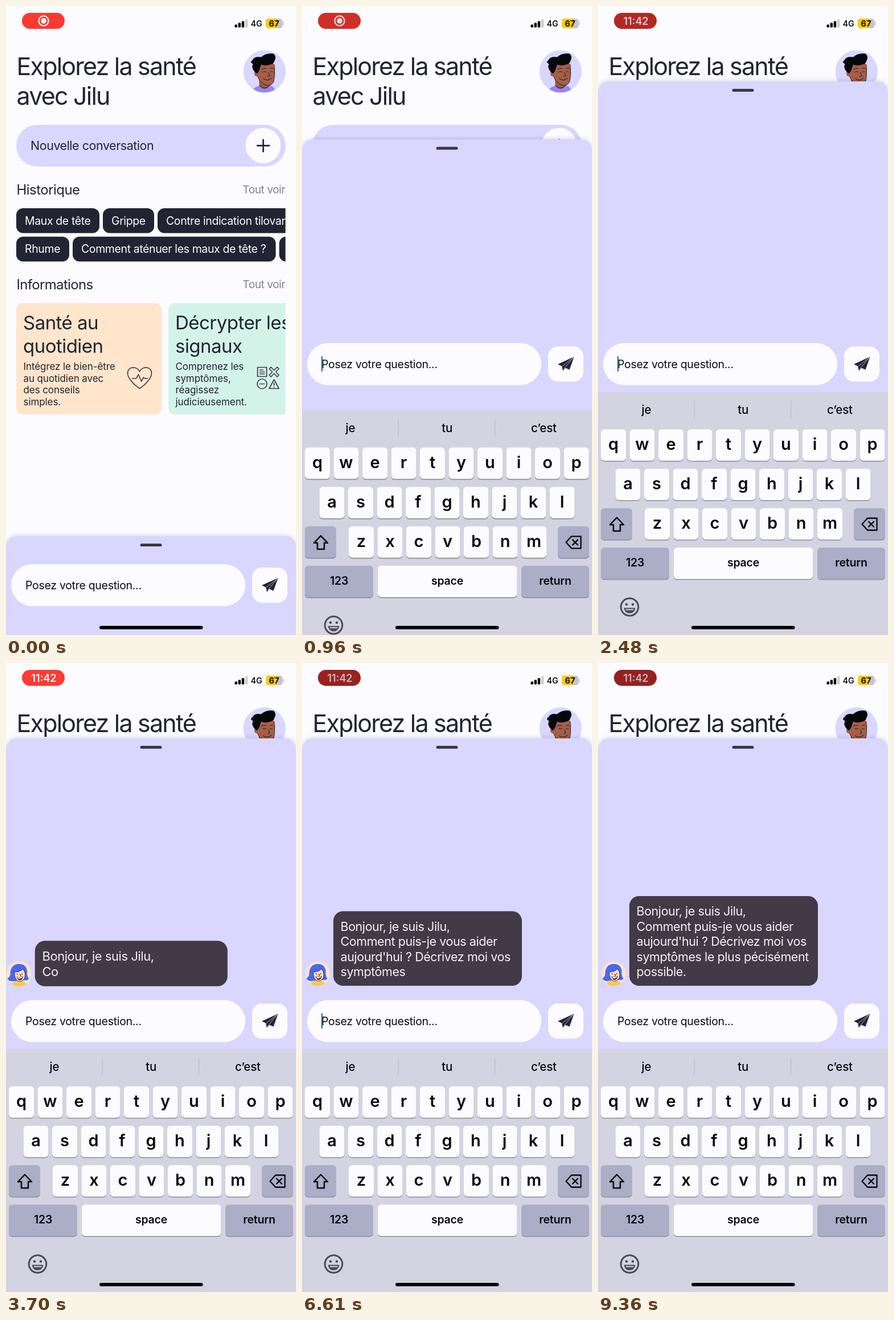
Animation of 509 by 1101 pixels, one loop 9.38 s. Source, as an HTML page with a canvas:

```html
<!DOCTYPE html>
<html lang="fr">
<head>
<meta charset="utf-8">
<title>Assistant santé</title>
<style>
html, body { margin: 0; width: 100%; height: 100%; overflow: hidden; background: #fcfbff; }
canvas { display: block; width: 509px; height: 1101px; }
</style>
</head>
<body>
<canvas id="stage"></canvas>
<script>
const W = 509, H = 1101, LOOP = 9380;
const INK = '#222433', PAPER = '#fcfbff', LILAC = '#d9d7ff', PLUM = '#433a47';
const canvas = document.getElementById('stage');
const c = canvas.getContext('2d');
const dpr = window.devicePixelRatio || 1;
canvas.width = W * dpr;
canvas.height = H * dpr;

const MESSAGE = [
  'Bonjour, je suis Jilu,',
  'Comment puis-je vous aider',
  "aujourd'hui ? Décrivez moi vos",
  'symptômes le plus pécisément',
  'possible.'
];

// helpers
const clamp = x => Math.max(0, Math.min(1, x));
const spring = x => x <= 0 ? 0 : 1 - (1 + x) * Math.exp(-x);

function text(s, x, y, size, o = {}) {
  c.font = `${o.weight || 400} ${size}px Inter, Roboto, sans-serif`;
  c.letterSpacing = (o.track ?? -0.022) * size + 'px';
  c.textAlign = o.align || 'left';
  c.fillStyle = o.color || INK;
  c.fillText(s, x, y);
}

function box(x, y, w, h, r, fill) {
  c.beginPath();
  c.roundRect(x, y, w, h, r);
  c.fillStyle = fill;
  c.fill();
}

function disc(x, y, r, fill) {
  c.beginPath();
  c.arc(x, y, r, 0, 7);
  c.fillStyle = fill;
  c.fill();
}

function shape(d, fill) {
  c.fillStyle = fill;
  c.fill(new Path2D(d));
}

function line(d, color, width) {
  c.strokeStyle = color;
  c.lineWidth = width;
  c.lineCap = c.lineJoin = 'round';
  c.stroke(new Path2D(d));
}

function at(x, y, draw) {
  c.save();
  c.translate(x, y);
  draw();
  c.restore();
}

// recording badge brightness: [time, level], eased between
const PULSE = [[0, .95], [980, .55], [1900, 1], [2800, 0], [3650, 1], [4800, 0],
  [5700, 1], [6750, 0], [7800, 1], [8400, 1], [9380, 0]];

function pulse(t) {
  const i = PULSE.findIndex(p => p[0] > t);
  const [t0, a] = PULSE[i - 1], [t1, b] = PULSE[i];
  return a + (b - a) * (1 - Math.cos(Math.PI * (t - t0) / (t1 - t0))) / 2;
}

function statusBar(t) {
  const k = pulse(t), mix = (a, b) => Math.round(a + (b - a) * k);
  const white = `rgb(${mix(192, 255)},${mix(188, 255)},${mix(190, 255)})`;
  box(28, 12, 75, 28, 14, `rgb(${mix(150, 255)},${mix(32, 59)},${mix(30, 49)})`);
  if (t < 2000) {
    disc(66, 26, 4.8, white);
    c.beginPath();
    c.arc(66, 26, 8.6, 0, 7);
    c.strokeStyle = white;
    c.lineWidth = 2.2;
    c.stroke();
  } else {
    text('11:42', 66.5, 32.5, 18, { weight: 600, color: white, align: 'center', track: 0 });
  }
  for (let i = 0; i < 4; i++) {
    const h = 5 + i * 3;
    box(401.5 + i * 6.1, 37.5 - h, 4.4, h, 1.2, i < 3 ? '#000' : '#cbcbd0');
  }
  text('4G', 429.5, 36, 14.3, { weight: 600, color: '#111', track: 0 });
  box(456, 22, 29.5, 17, 5, '#c5c5ca');
  c.save();
  c.beginPath();
  c.rect(456, 22, 20, 17);
  c.clip();
  box(456, 22, 29.5, 17, 5, '#ffcc00');
  c.restore();
  box(486.3, 27.5, 1.6, 6, 1, '#c5c5ca');
  text('67', 470.5, 36, 15, { weight: 700, color: '#111', align: 'center', track: 0 });
}

function userAvatar() {
  c.save();
  disc(0, 0, 37, LILAC);
  c.beginPath();
  c.arc(0, 0, 37, 0, 7);
  c.clip();
  shape('M-22 40Q-21 27-9 25L9 24Q19 27 21 40Z', '#9187fa');
  shape('M-10 10L-9 26Q1 36 9 25L10 12Z', '#9a5945');
  shape('M-13-12Q3-19 17-13Q20 4 16 18Q12 26 4 24Q-8 21-12 9Q-18 9-18 3Q-17-2-12 0Z', '#a45f49');
  shape('M-13 4L-17 1Q-24-7-20-13Q-27-16-21-20Q-17-27-6-25Q4-33 16-31Q22-26 17-17Q16-13 10-12Q2-9-6-12L-9-2Z', '#08080c');
  line('M-9 25Q1 34 9 24M-12 9Q-8 21 4 24Q12 26 16 18Q19 4 17-12', '#1b1728', .9);
  line('M-5-4Q-1-7 3-5M10-5Q13-7 15-5M-3 1Q0-1 3 1M10 1Q12-1 14 1M7 2L9 8L6 9M-2 13Q6 18 12 12', '#25140f', 1);
  c.restore();
}

function assistantAvatar() {
  c.save();
  disc(0, 0, 21.5, '#fee3ca');
  c.beginPath();
  c.arc(0, 0, 21.5, 0, 7);
  c.clip();
  shape('M-20 8Q-14 5-15-3Q-13-16-1-17Q13-17 14-4Q13 4 17 8Q15 12 10 11L-11 13Q-18 13-20 8Z', '#4868ee');
  shape('M-15 24Q-14 14-5 13L6 13Q15 16 16 24Z', '#fac83f');
  shape('M-4 8L-4 14Q0 19 6 14L6 8Z', '#f8c6a5');
  shape('M-8-3Q2-3 6-8Q12-4 10 6Q7 14 0 13Q-8 11-8-3Z', '#ffd9bd');
  line('M-8-3Q2-3 6-8Q12-4 10 6Q7 14 0 13Q-8 11-8-3', '#252c50', .9);
  line('M-3 0V1M5 0V1M2 1L3 4', '#252438', 1.3);
  shape('M-4 5Q2 7 7 4Q6 11 1 11Q-3 10-4 5Z', '#40212a');
  shape('M-3 6Q2 7 6 5L5 7Q1 9-2 8Z', '#fff');
  c.restore();
}

function chip(s, x, y, w) {
  box(x, y, w, 43.5, 12, INK);
  text(s, x + 15, y + 28.5, 19.5, { color: PAPER, track: -.02 });
}

function card(x, fill, title, body) {
  box(x, 520, 255, 195, 12, fill);
  title.forEach((s, i) => text(s, x + 12, 566 + i * 41, 33, { track: -.016 }));
  body.forEach((s, i) => text(s, x + 12.5, 637 + i * 20.5, 17, { track: -.005 }));
}

function home() {
  text('Explorez la santé', 18.5, 120.5, 43, { track: -.042 });
  text('avec Jilu', 18.5, 173, 43, { track: -.042 });
  at(453.7, 114.5, userAvatar);

  box(18, 208, 473, 73, 36.5, LILAC);
  text('Nouvelle conversation', 43, 252, 21.5);
  disc(451.3, 244.3, 31, PAPER);
  line('M441 244.3H462M451.5 234V255', INK, 2.7);

  const more = { color: '#83828a', align: 'right' };
  text('Historique', 18.5, 330, 24);
  text('Tout voir', 490, 328, 19, more);
  text('Informations', 18.5, 496, 24, { track: -.028 });
  text('Tout voir', 490, 494, 19, more);

  c.save();
  c.beginPath();
  c.rect(18, 340, 472.5, 400);
  c.clip();
  chip('Maux de tête', 18, 354, 146);
  chip('Grippe', 170, 354, 90);
  chip('Contre indication tilovane', 266, 354, 270);
  chip('Rhume', 18, 403.7, 93);
  chip('Comment aténuer les maux de tête ?', 117, 403.7, 356.5);
  chip('Fièvre', 479.5, 403.7, 90);
  card(18, '#fee5cb', ['Santé au', 'quotidien'],
    ['Intégrez le bien-être', 'au quotidien avec', 'des conseils', 'simples.']);
  card(285, '#d4f3e8', ['Décrypter les', 'signaux'],
    ['Comprenez les', 'symptômes,', 'réagissez', 'judicieusement.']);
  c.restore();

  at(234.5, 651, () => line('M0 18.5C-12 11-21-1-21-8C-21-21-4-21 0-11C4-21 21-21 21-8C21-1 12 11 0 18.5Z' +
    'M-13 1H-6L-2-6L3 6L7-1L9 1H14', PLUM, 1.6));
  at(460, 651, () => {
    line('M-18.5-18.5H-2.5V-2.5H-18.5ZM-14.5-14H-9M-14.5-10.5H-6.5M-14.5-7H-6.5', PLUM, 1.7);
    line('M2-16L5-19L10.5-13.5L16-19L19-16L13.5-10.5L19-5L16-2L10.5-7.5L5-2L2-5L7.5-10.5Z', PLUM, 1.6);
    line('M-2 10.5A8.5 8.5 0 1 1-19 10.5A8.5 8.5 0 1 1-2 10.5ZM-14.5 10.5H-6.5', PLUM, 1.7);
    line('M10.5 3L19 18.5H2ZM10.5 9V13M10.5 15.8V16', PLUM, 1.7);
  });
}

function inputBar(y, t, focused) {
  box(9, y, 411, 73.5, 36.7, PAPER);
  text('Posez votre question...', 34, y + 43.5, 19.5, { color: '#0b0b10', track: -.015 });
  if (focused) {
    // solid just after focus, then a soft blink
    const p = t / 1100 % 1;
    const blink = p > .5 ? clamp((p - .88) / .08) : clamp((.34 - p) / .07);
    c.globalAlpha = t < 1400 ? 1 : blink;
    box(33.8, y + 23, 2.4, 27, 1.2, '#4767d2');
    c.globalAlpha = 1;
  }
  box(432, y + 6, 62, 61.5, 17, PAPER);
  at(463, y + 36.5, () => {
    shape('M14.5-12.5L-14 .5L-7 4L-5 12.5L-1 7L6.5 10Z', INK);
    line('M13-11L-6.5 4.2M13-11L-1.5 6.5L-4.5 11', '#b9b8cd', .9);
  });
}

function bubble(t) {
  const x = (t - 2500) / 1000;
  if (x <= 0) return;
  const scale = 1 - Math.exp(-3.2 * x) * Math.cos(2.6 * x);
  let left = Math.floor(t < 5410 ? 25 + (t - 3700) / 47.5 : 61 + (t - 5410) / 41);
  const lines = [];
  for (const s of MESSAGE) {
    if (left <= 0 && lines.length) break;
    lines.push(s.slice(0, Math.max(0, left)));
    left -= s.length + 1;
  }
  const h = 25 + 26.4 * lines.length, top = 565 - h, mid = 565 - h / 2;
  c.save();
  c.translate(254, mid);
  c.scale(scale, scale);
  c.translate(-254, -mid);
  at(27.7, 543.7, assistantAvatar);
  box(55, top, 331, h, 17, PLUM);
  lines.forEach((s, i) => text(s, 67.5, top + 34.3 + i * 26.4, 21.5, { color: '#f4f0f6', track: -.02 }));
  c.restore();
}

function key(x, y, w, fill = PAPER) {
  box(x, y + 1.6, w, 55, 6, '#8d8d9b');
  box(x, y, w, 55, 6, fill);
}

function keyboard(top) {
  if (top >= H) return;
  const grey = '#abaec6', black = '#08080c';
  at(0, top, () => {
    c.fillStyle = '#d4d3e2';
    c.fillRect(0, 0, W, 500);
    ['je', 'tu', 'c’est'].forEach((s, i) =>
      text(s, 85 + i * 169.7, 38, 20.5, { weight: 500, align: 'center', color: black, track: -.01 }));
    c.fillStyle = '#b7b7c6';
    c.fillRect(168.5, 15, 1, 31);
    c.fillRect(338, 15, 1, 31);

    [['qwertyuiop', 5], ['asdfghjkl', 30.5], ['zxcvbnm', 82]].forEach(([row, x0], r) => {
      [...row].forEach((ch, i) => {
        const x = x0 + i * 50.5, y = 65 + r * 69;
        key(x, y, 44);
        text(ch, x + 22, y + 36, 29, { weight: 600, align: 'center', color: black, track: 0 });
      });
    });

    key(5, 203, 55, grey);
    key(449, 203, 55, grey);
    line('M33 219.5L45 232H39V243H27V232H21Z', black, 2.5);
    line('M473 220.5H489.5V241.5H473L463.5 231ZM475 226.5L484 235.5M484 226.5L475 235.5', black, 2.3);

    key(5, 272, 120, grey);
    key(133, 272, 244.5);
    key(385, 272, 119, grey);
    [['123', 65], ['space', 255], ['return', 444.5]].forEach(([s, x]) =>
      text(s, x, 305, 19.5, { weight: 600, align: 'center', color: black, track: -.01 }));

    const face = '#4c4c57';
    c.beginPath();
    c.arc(55.5, 376, 15.3, 0, 7);
    c.strokeStyle = face;
    c.lineWidth = 3;
    c.stroke();
    disc(50, 371.5, 2.2, face);
    disc(61, 371.5, 2.2, face);
    shape('M45.5 377.5H65.5Q64 387 55.5 387Q47 387 45.5 377.5Z', face);
    line('M49.5 380.5H61.5', '#d4d3e2', 2);
  });
}

function sheet(t) {
  const top = 928 - 796 * spring((t - 410) * .0065);
  c.save();
  c.shadowColor = 'rgba(30,30,50,.22)';
  c.shadowBlur = 9 * dpr;
  box(0, top, W, H - top + 40, 20, LILAC);
  c.restore();
  box(235.5, top + 13, 38, 5, 2.5, '#3d3743');
  bubble(t);
  inputBar(Math.max(590, top + 49), t, t > 317);
  keyboard(H - 425 * spring((t - 317) * .0066));
}

function draw(t) {
  c.setTransform(dpr, 0, 0, dpr, 0, 0);
  c.fillStyle = PAPER;
  c.fillRect(0, 0, W, H);
  home();
  sheet(t);
  statusBar(t);
  box(164, 1085, 181.5, 6, 3, '#000');
}

const start = performance.now();
function tick() {
  draw((performance.now() - start) % LOOP);
  requestAnimationFrame(tick);
}
tick();
</script>
</body>
</html>
```
